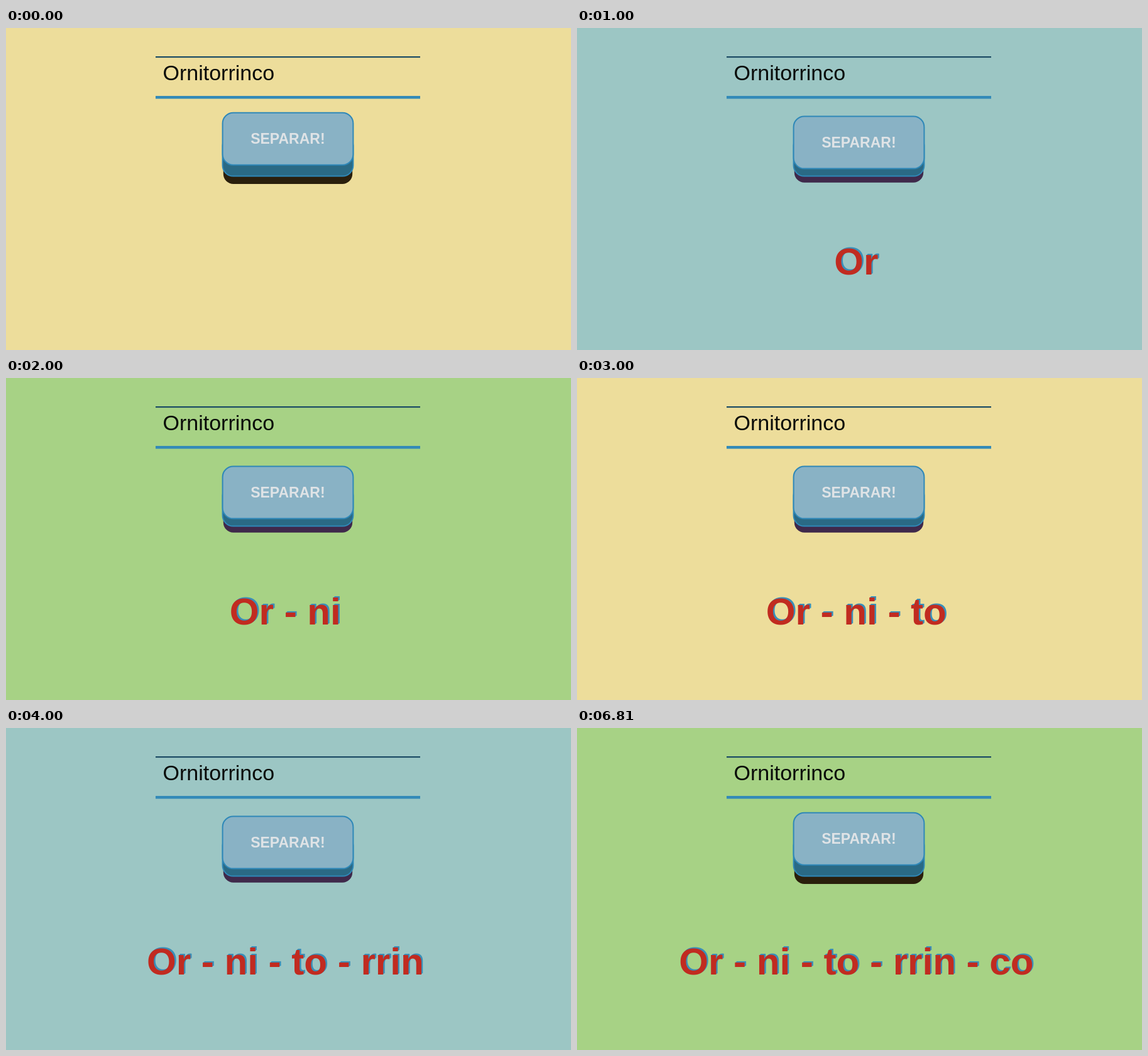
An HTML page that plays this animation: 899 px wide and 512 px high, repeating every 8.03 s.

```html
<!DOCTYPE html>
<html lang="pt">
<head>
<meta charset="utf-8">
<style>
  html, body { margin: 0; width: 100%; height: 100%; overflow: hidden; }
  svg { display: block; width: 899px; height: 512px; }
  text { font-family: "Liberation Sans", Arial, sans-serif; white-space: pre; }
  .edge { stroke: #2f88b8; stroke-width: 2; }
  .label { font-size: 23px; font-weight: bold; fill: #dfe3e6; text-anchor: middle; }
  .split { font-size: 60.1px; font-weight: bold; fill: #3a8fb9; text-anchor: middle; }
  .split.front { fill: #c12b20; }
</style>
</head>
<body>
<svg viewBox="0 0 899 512">
  <rect id="back" width="899" height="512"/>
  <rect x="238" y="45" width="421" height="2.2" fill="#1a4a63"/>
  <rect x="238" y="108" width="421" height="4.5" fill="#338ab8"/>
  <text x="249.5" y="83" font-size="34" fill="#080a08">Ornitorrinco</text>

  <rect id="shadow" x="345.8" y="175" width="205.4" rx="16"/>
  <rect class="edge" x="344.6" y="170" width="207.8" height="65.6" rx="17" fill="#2a6a85"/>
  <g id="cap">
    <rect class="edge" x="344.6" y="134.8" width="207.8" height="83" rx="17" fill="#89b2c5"/>
    <text class="label" x="448.4" y="184">SEPARAR!</text>
  </g>

  <text class="split" x="446.7" y="389.6"></text>
  <text class="split" x="445.5" y="390.8"></text>
  <text class="split front" x="444.3" y="392"></text>
</svg>
<script>
  const LOOP = 8030;
  const starts = [0, 1000, 2000, 3000, 4000, 4970];
  const colours = ['#eddd9b', '#9cc6c4', '#a7d285'];
  const syllables = ['Or', 'ni', 'to', 'rrin', 'co'];
  const [back, shadow, cap] = ['back', 'shadow', 'cap'].map(id => document.getElementById(id));
  const layers = document.querySelectorAll('.split');
  let shown = -1;

  function show(step) {
    const pressed = step > 0 && step < syllables.length;
    back.setAttribute('fill', colours[step % colours.length]);
    cap.setAttribute('transform', `translate(0 ${pressed ? 5.8 : 0})`);
    shadow.setAttribute('height', pressed ? 70.8 : 73);
    shadow.setAttribute('fill', pressed ? '#3f294b' : '#2a1f0c');
    const text = syllables.slice(0, step).join(' - ');
    layers.forEach(layer => { layer.textContent = text; });
  }

  function tick() {
    const time = performance.now() % LOOP;
    const step = starts.filter(start => start <= time).length - 1;
    if (step !== shown) show(shown = step);
    requestAnimationFrame(tick);
  }
  tick();
</script>
</body>
</html>
```
